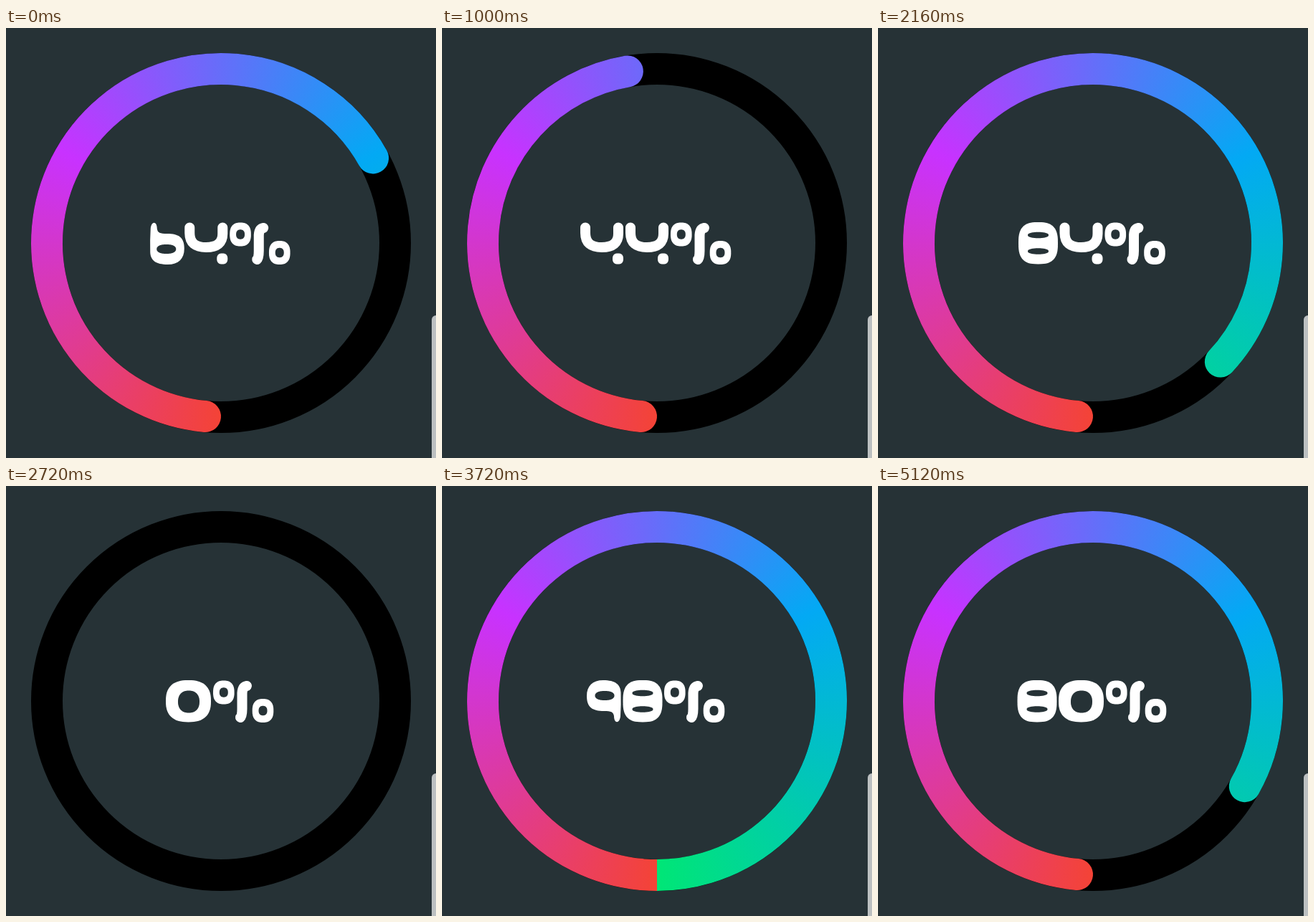
These frames come from a looping animation (600 px wide and 600 px high, 5.16 s). An HTML page with a canvas:

```html
<!DOCTYPE html>
<html lang="en">
<head>
<meta charset="utf-8">
<title>Ring slider</title>
<style>
  html, body { margin: 0; width: 100%; height: 100%; overflow: hidden; background: #263236; }
  canvas { display: block; width: 100vw; height: 100vh; }
</style>
</head>
<body>
<canvas id="stage" width="600" height="600"></canvas>
<script>
const ctx = document.getElementById('stage').getContext('2d');
const BG = '#263236';
const LOOP = 5160, STEP = 40;
const C = 300, RADIUS = 243, WIDTH = 44;
const CAP = Math.asin(WIDTH / 2 / RADIUS);
const BOTTOM = Math.PI / 2;

// Each drag eases to a new percentage; a higher lag starts it more slowly
const START = 64;
const drags = [
  { from: 240, to: 1180, value: 32, lag: 2.6 },
  { from: 1280, to: 1740, value: 3.3, lag: 1 },
  { from: 1740, to: 2300, value: 99, lag: 1 },
  { from: 2320, to: 2720, value: 0, lag: 1 },
  { from: 2840, to: 3720, value: 98.5, lag: 1.9 },
  { from: 3840, to: 4560, value: 67.7, lag: 1 },
  { from: 4560, to: 5200, value: 82.3, lag: 2 }
];

const smooth = u => u * u * (3 - 2 * u);

function valueAt(t) {
  let value = START;
  for (const d of drags) {
    if (t < d.from) break;
    const u = Math.min(1, (t - d.from) / (d.to - d.from));
    value += (d.value - value) * smooth(u ** d.lag);
  }
  return value;
}

// Superellipse: a higher n gives squarer sides
function blob(x, y, rx, ry, n = 2.5, color = '#fff') {
  const bend = (v, r) => Math.sign(v) * Math.abs(v) ** (2 / n) * r;
  ctx.beginPath();
  for (let i = 0; i < 72; i++) {
    const a = i * Math.PI / 36;
    ctx.lineTo(x + bend(Math.cos(a), rx), y + bend(Math.sin(a), ry));
  }
  ctx.fillStyle = color;
  ctx.fill();
}

const hole = (x, y, rx, ry, n = 2.3) => blob(x, y, rx, ry, n, BG);

function line(path) {
  ctx.lineWidth = 14;
  ctx.lineCap = ctx.lineJoin = 'round';
  ctx.strokeStyle = '#fff';
  ctx.stroke(new Path2D(path));
}

function loop(x, y) {
  blob(x, y, 14.8, 16.5);
  hole(x, y, 6, 6.7);
}

function nine() {
  ctx.fillStyle = '#fff';
  ctx.fill(new Path2D('M23 0C40 0 47 6 47.5 17Q48 34 47 50C46 61 38 61 38 50' +
    'C37 44 34 43 24 43C8 43 0 38 0 22C0 8 8 0 23 0Z'));
  hole(25, 21.5, 13.5, 6.5);
}

function six() {
  ctx.translate(49, 59);
  ctx.rotate(Math.PI);
  nine();
}

function four() {
  line('M7 7.5V15C7 29 15 35 30 35Q53 35 53 16V7.5');
  blob(52.5, 51, 7.5, 7.5);
}

function eight() {
  blob(28, 29.2, 27.5, 29.2, 2.8);
  hole(28, 18, 14.5, 4.2);
  hole(28, 40.5, 14.5, 4.2);
}

function zero() {
  blob(31.5, 29.2, 31.5, 29.2);
  hole(32, 30, 15, 15.5);
}

function percent() {
  loop(14.8, 17);
  line('M38 52Q40.5 50 40.5 40V18Q41 9 47 8');
  loop(69.5, 42.5);
}

// Advance and drawing of each glyph, 59 units tall
const glyphs = {
  0: [66, zero],
  1: [24, () => line('M7 8Q14 8 14 18V51')],
  2: [52, () => line('M7 10C20 5 40 5 40 17S8 30 8 45Q8 52 41 51')],
  3: [52, () => line('M7 8C50 3 50 28 20 28C52 28 50 58 7 51')],
  4: [63, four],
  5: [52, () => line('M40 8H10V25C52 20 52 58 7 51')],
  6: [49.5, six],
  7: [50, () => line('M7 8H40Q25 30 23 51')],
  8: [58, eight],
  9: [50, nine],
  '%': [85, percent]
};

function label(text) {
  const parts = [...text].map(ch => glyphs[ch]);
  let x = 298.5 - parts.reduce((sum, p) => sum + p[0], 0) / 2;
  for (const [advance, draw] of parts) {
    ctx.save();
    ctx.translate(x, 271);
    draw();
    ctx.restore();
    x += advance;
  }
}

const hues = ctx.createConicGradient(BOTTOM, C, C);
['#f44336', '#c832ff', '#03a9f4', '#00e676'].forEach((c, i) => hues.addColorStop(i / 3, c));

function ring(start, sweep, color) {
  ctx.beginPath();
  ctx.arc(C, C, RADIUS, start, start + sweep);
  ctx.lineWidth = WIDTH;
  ctx.lineCap = 'round';
  ctx.strokeStyle = color;
  ctx.stroke();
}

function edgeHandle() {
  ctx.beginPath();
  ctx.roundRect(594, 401, 20, 220, 6);
  ctx.fillStyle = '#bcc0c1';
  ctx.fill();
}

function frame(now) {
  const t = Math.floor(now % LOOP / STEP) * STEP;
  const value = valueAt(t), turn = 2 * Math.PI;
  ctx.fillStyle = BG;
  ctx.fillRect(0, 0, 600, 600);
  ring(0, turn, '#000');
  if (value > 0) ring(BOTTOM + CAP, Math.min(CAP + value / 100 * turn, turn), hues);
  label(Math.floor(value) + '%');
  edgeHandle();
}

const began = performance.now();
function tick() {
  frame(performance.now() - began);
  requestAnimationFrame(tick);
}
tick();
</script>
</body>
</html>
```
